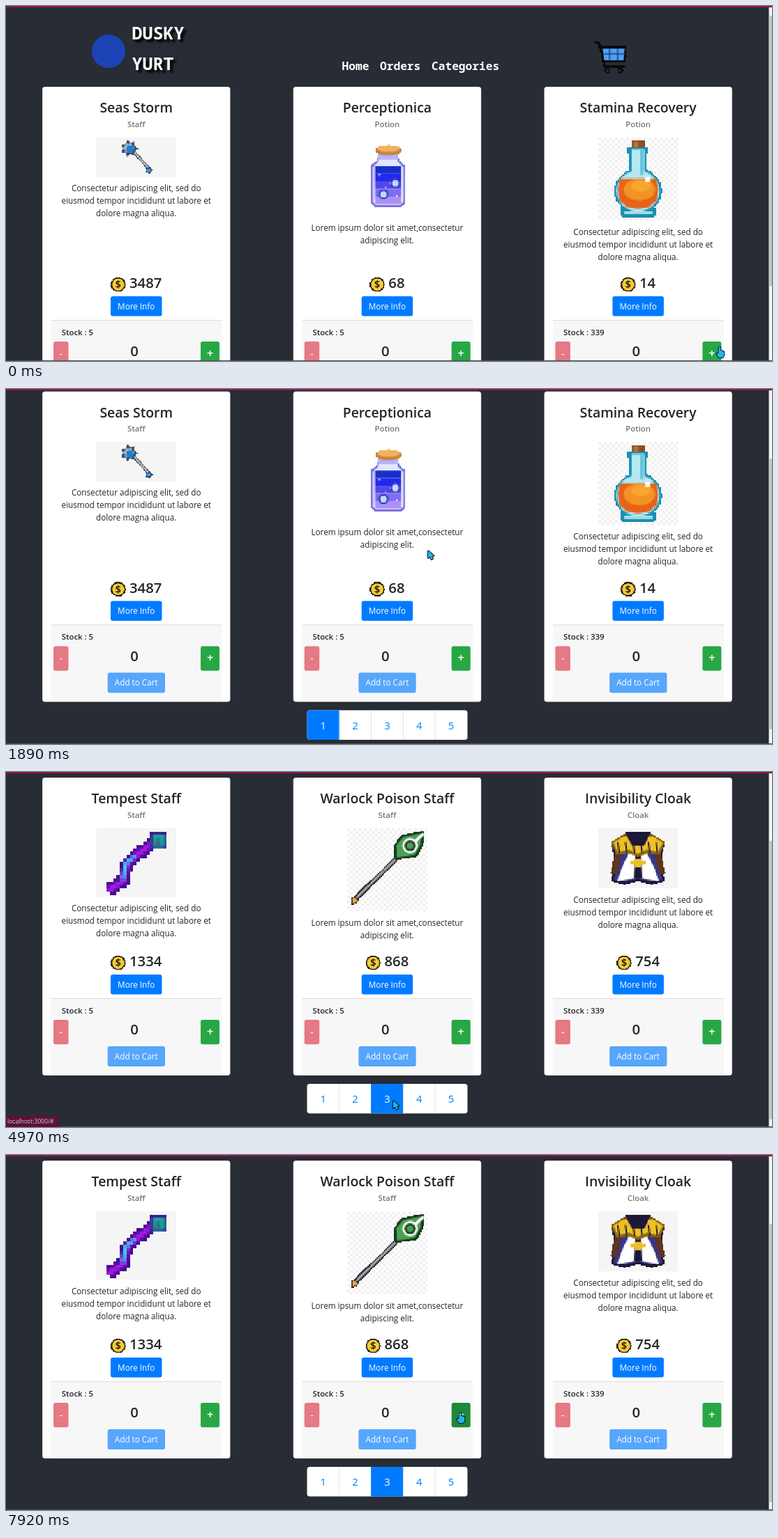
An HTML page with a canvas for the animation above (8 s loop, 1098x510 px).

```html
<!DOCTYPE html>
<html lang="en">
<head>
<meta charset="utf-8">
<title>Shop</title>
<style>
html, body { margin: 0; width: 100%; height: 100%; overflow: hidden; background: #282c34; }
canvas { display: block; width: 1098px; height: 510px; }
</style>
</head>
<body>
<canvas id="stage" width="1098" height="510"></canvas>
<script>
const LOOP = 8000;
const ctx = document.getElementById('stage').getContext('2d');
const SANS = '"Open Sans", "Noto Sans", sans-serif';
const MONO = '"Noto Sans Mono", "DejaVu Sans Mono", monospace';
const INK = '#212529';
const clamp = v => Math.max(0, Math.min(1, v));
const smooth = v => clamp(v) ** 2 * (3 - 2 * clamp(v));

// ---- drawing helpers ----
function pen(g) {
  const trace = pts => {
    g.beginPath();
    for (let i = 0; i < pts.length; i += 2) g.lineTo(pts[i], pts[i + 1]);
  };
  const poly = (c, ...pts) => { trace(pts); g.fillStyle = c; g.fill(); };
  return {
    poly,
    rect(c, x, y, w, h) { g.fillStyle = c; g.fillRect(x, y, w, h); },
    line(c, w, ...pts) { trace(pts); g.strokeStyle = c; g.lineWidth = w; g.stroke(); },
    oval(c, x, y, rx, ry = rx) {
      g.beginPath(); g.ellipse(x, y, rx, ry, 0, 0, 7); g.fillStyle = c; g.fill();
    },
    // Symmetric shape: each pair is half a width and its height
    mirror(c, axis, ...half) {
      const right = [], left = [];
      for (let i = 0; i < half.length; i += 2) {
        right.push(axis + half[i], half[i + 1]);
        left.unshift(axis - half[i], half[i + 1]);
      }
      poly(c, ...right, ...left);
    },
    star(c, x, y, r, n) {
      const pts = [];
      for (let i = 0; i < 2 * n; i++) {
        const a = i * Math.PI / n, d = i % 2 ? r * 0.62 : r;
        pts.push(x + d * Math.cos(a), y + d * Math.sin(a));
      }
      poly(c, ...pts);
    }
  };
}
const main = pen(ctx);

function box(c, x, y, w, h, r = 3) {
  ctx.beginPath(); ctx.roundRect(x, y, w, h, r); ctx.fillStyle = c; ctx.fill();
}

function text(s, x, y, size, color = INK, weight = 400, align = 'center', family = SANS) {
  ctx.font = `${weight} ${size}px ${family}`;
  ctx.textAlign = align;
  ctx.fillStyle = color;
  ctx.fillText(s, x, y);
}

// Small hard-edged picture, enlarged by "cell" when shown
function sprite(w, h, cell, draw, unit = 1) {
  const c = document.createElement('canvas');
  c.width = Math.ceil(w / cell);
  c.height = Math.ceil(h / cell);
  const g = c.getContext('2d');
  g.scale(unit / cell, unit / cell);
  draw(pen(g));
  const img = g.getImageData(0, 0, c.width, c.height);
  for (let i = 3; i < img.data.length; i += 4) img.data[i] = img.data[i] > 110 ? 255 : 0;
  g.putImageData(img, 0, 0);
  return (x, y) => ctx.drawImage(c, x, y, c.width * cell, c.height * cell);
}

const plain = h => (x, y) => main.rect('#f5f5f5', x, y, 114.5, h);
const checkers = sprite(115, 119.5, 0.5, p => {
  p.rect('#fff', 0, 0, 115, 120);
  for (let i = 0; i < 29; i++)
    for (let j = i % 2; j < 30; j += 2) p.rect('#f1f1f1', i * 4, j * 4, 4, 4);
});

// ---- pictures ----
const coin = sprite(22, 22, 1.3, p => {
  p.oval('#15130c', 10.7, 10.7, 10.7);
  p.oval('#f7cb35', 10.7, 10.7, 8.8);
});

const cart = sprite(48, 48, 1.6, p => {
  p.poly('#0a0a0a', 8, 7, 47, 7, 45, 30, 13, 30);
  p.poly('#4f9ff5', 12, 10, 44, 10, 42, 27, 15, 27);
  for (const x of [22, 34]) p.line('#173b78', 2, x, 10, x, 28);
  p.line('#173b78', 2, 12, 18, 45, 18);
  p.line('#0a0a0a', 3, 0, 2, 7, 2, 15, 36, 44, 36);
  for (const x of [19, 37]) { p.oval('#0a0a0a', x, 42, 4); p.oval('#555', x, 42, 1.5); }
});

const seaStaff = sprite(115, 57, 1.4, p => {
  p.line('#4c505e', 4.5, 54, 21, 79, 49);
  p.line('#c6c9d4', 2.2, 54, 21, 79, 49);
  p.star('#3d5470', 47, 16, 13, 7);
  p.star('#9db8cc', 46, 15, 9, 6);
  p.oval('#1b7fd3', 48, 17, 5);
  p.star('#2b4f78', 75, 47, 6, 5);
  p.rect('#4aa3e0', 73, 45, 4, 4);
});

const jar = sprite(115, 114, 1.7, p => {
  p.mirror('#7b73dc', 58.5, 15, 28, 16, 33, 25, 41, 25, 94, 19, 100);
  p.mirror('#e2e5ff', 58.5, 13, 28, 14, 35, 22, 43, 22, 93, 17, 97);
  for (let i = 0; i < 5; i++)
    p.rect(`hsl(${232 + i * 6}, 80%, ${44 + i * 8}%)`, 40, 41 + i * 11, 37, 11);
  for (let i = 0; i < 6; i++) p.rect('#fff', 45 + i * 23 % 30, 53 + i * 6, 2, 2);
  for (const [x, y] of [[52, 82], [69, 66]]) {
    p.oval('#2f3fc4', x, y, 7);
    p.oval('#c4d8ff', x, y, 4.8);
  }
  p.rect('#b5b4f4', 44, 22, 29, 10);
  p.oval('#c98443', 59, 19, 19, 7);
  p.oval('#f2b25e', 59, 16, 16, 5);
});

const flask = sprite(115, 119.5, 2.3, p => {
  const glass = '#1b8fb0', pale = '#b4e8f3';
  p.rect('#8f4c26', 48, 4, 18, 12);
  p.rect('#b9713a', 50, 6, 8, 8);
  p.oval(glass, 57, 77, 34, 32);
  p.rect(glass, 33, 101, 49, 13);
  p.rect(glass, 42, 14, 30, 9);
  p.rect(glass, 45, 22, 24, 34);
  p.oval(pale, 57, 77, 31, 29);
  p.rect(pale, 48, 17, 18, 44);
  p.rect('#66c3dc', 60, 18, 5, 36);
  p.rect(pale, 37, 106, 41, 4);
  p.mirror('#e5641c', 57, 26, 59, 29, 74, 27, 90, 16, 100, 0, 103);
  p.oval('#f39324', 59, 75, 23, 16);
  p.oval('#f7a631', 61, 70, 14, 8);
  p.rect('#fff', 67, 57, 7, 7);
});

const rainbow = sprite(115, 120, 7.14, p => {
  const hues = ['#f00', '#f00', '#ffa500', '#fff000', '#6ccc16', '#6ccc16', '#a100f0'];
  ['#bf5a38', '#d9d9d9', '#a34a2c'].forEach((c, i) => p.rect(c, 7 - i % 2, 2 + i, 3 + i % 2 * 2, 1));
  p.rect('#c9a399', 7, 3, 3, 1);
  for (let i = 0; i < 9; i++) {
    const d = Math.abs(i - 4), top = d < 2 ? 5 : d + 5;
    p.rect('#cdcdcd', 4 + i, top, 1, (d < 4 ? 15 : 14) - top);
    if (d < 4) p.rect(hues[i - 1], 4 + i, Math.max(8, top + 1), 1, 6 - Math.max(0, d - 2));
  }
  p.rect('#ffc400', 8, 5, 1, 4);
  p.rect('#1b1e86', 10, 12, 2, 2);
}, 7.14);

const skull = sprite(115, 119.5, 4.2, p => {
  p.line('#161616', 11, 5, 113, 46, 72, 76, 44);
  p.line('#5c5c5c', 4, 8, 109, 46, 70, 76, 42);
  p.mirror('#161616', 90, 16, 5, 23, 12, 23, 35, 16, 48, 10, 52);
  p.mirror('#6a6a6a', 90, 13, 9, 19, 15, 19, 30, 12, 34);
  p.rect('#929292', 78, 10, 17, 6);
  for (const x of [82, 98]) { p.rect('#eab0a5', x, 19, 9, 9); p.rect('#c23a2c', x + 4, 23, 4, 5); }
  for (const x of [79, 91]) p.rect('#7c7c7c', x, 39, 9, 7);
});

const bust = sprite(115, 119.5, 3.3, p => {
  const edge = '#0c0f24', blue = '#3b5cf0';
  for (const x of [18, 96])
    [edge, blue, edge, '#fff'].forEach((c, i) => p.oval(c, x, 70, 14 - i * 3, 17 - i * 3));
  p.mirror(edge, 57, 15, 50, 37, 62, 45, 78, 37, 95, 18, 108);
  p.mirror(blue, 57, 13, 54, 33, 64, 40, 78, 33, 92, 16, 104);
  p.mirror('#1a2490', 57, 32, 75, 28, 90, 12, 101);
  p.oval('#bfe2ff', 44, 65, 6);
  p.rect('#7db2ff', 76, 90, 7, 7);
  p.rect(edge, 43, 18, 28, 36);
  p.rect('#cdd4da', 46, 20, 22, 38);
  p.rect('#8795a3', 56, 22, 4, 26);
  p.rect('#c74a12', 41, 4, 33, 17);
  p.rect('#ff9d1c', 43, 7, 28, 8);
});

const tempest = sprite(115, 98.5, 4.8, p => {
  const rod = [16, 90, 38, 76, 44, 50, 84, 18];
  p.line('#4a0b8f', 17, ...rod);
  p.line('#a21be8', 8, ...rod);
  p.line('#36d3ee', 5, 38, 74, 42, 50, 56, 40);
  p.rect('#4a0b8f', 76, 6, 26, 24);
  p.rect('#17a39b', 80, 9, 19, 18);
  p.rect('#2d6f86', 84, 16, 8, 8);
});

const warlock = sprite(115, 119.5, 1.9, p => {
  p.line('#26262c', 7, 11, 102, 78, 36);
  p.line('#a7a3ad', 3.5, 11, 102, 78, 36);
  p.star('#33250f', 10, 104, 7, 3);
  p.star('#e0a75a', 10, 104, 5, 3);
  p.poly('#163d1d', 68, 46, 66, 24, 78, 10, 110, 4, 109, 24, 100, 41);
  p.poly('#4d9f55', 71, 42, 70, 25, 80, 13, 105, 8, 105, 23, 97, 38);
  p.line('#fff', 4, 94, 22, 109, 8);
  ['#fff', '#163d1d', '#4d9f55'].forEach((c, i) => p.oval(c, 90, 25, 11 - i * 3));
});

const cloak = sprite(115, 86.5, 1.7, p => {
  const navy = '#1b1838', gold = '#efc024';
  p.mirror(navy, 57, 20, 8, 38, 24, 32, 48, 39, 76, 20, 81, 0, 76);
  p.mirror('#3a3685', 57, 18, 20, 28, 46, 35, 74, 18, 77, 0, 72);
  p.mirror('#fff', 57, 12, 34, 22, 54, 30, 76, 0, 71);
  p.mirror(navy, 57, 4, 34, 6, 72);
  for (const side of [-1, 1]) p.line('#5d3520', 9, 57 + side * 28, 35, 57 + side * 35, 66);
  p.mirror('#8f6a0e', 57, 20, 9, 39, 20, 31, 38, 14, 36, 0, 41);
  p.mirror(gold, 57, 21, 12, 35, 21, 29, 34, 13, 31, 0, 37);
  for (let x = 28; x < 90; x += 11) p.line(navy, 1.8, x, 20, x + 2, 36);
  p.mirror(navy, 57, 18, 6, 9, 25);
  p.rect(gold, 46, 47, 22, 5);
  p.rect(gold, 52, 44, 10, 12);
});

// ---- content ----
const LONG = ['Consectetur adipiscing elit, sed do', 'eiusmod tempor incididunt ut labore et', 'dolore magna aliqua.'];
const BRIEF = ['Lorem ipsum dolor sit amet,consectetur', 'adipiscing elit.'];
const LOREM = ['Lorem Sed do eiusmod tempor', 'incididunt ut labore et dolore magna', 'aliqua.'];
const STOCK = [5, 5, 339];
const item = (name, kind, price, lines, h, art, back) => ({ name, kind, price, lines, h, art, back });
const PAGES = [
  { h: 446, items: [
    item('Seas Storm', 'Staff', 3487, LONG, 57, seaStaff, plain(57)),
    item('Perceptionica', 'Potion', 68, BRIEF, 114, jar),
    item('Stamina Recovery', 'Potion', 14, LONG, 119.5, flask, checkers)] },
  { h: 446, items: [
    item('Rainbow Potion', 'Potion', 487, LONG, 114, rainbow),
    item('Raising Skull', 'Staff', 4684, LOREM, 119.5, skull, checkers),
    item('Magic Bust', 'Potion', 18, LOREM, 119.5, bust, checkers)] },
  { h: 428, items: [
    item('Tempest Staff', 'Staff', 1334, LONG, 98.5, tempest, plain(98.5)),
    item('Warlock Poison Staff', 'Staff', 868, BRIEF, 119.5, warlock, checkers),
    item('Invisibility Cloak', 'Cloak', 754, LONG, 86.5, cloak, plain(86.5))] }
];

// ---- motion ----
// Screen refreshes seen so far in a move that shows n of them from a to b
function refreshes(t, a, b, n) {
  if (t < a) return 0;
  return Math.min(n, 1 + Math.floor((t - a + 25) * (n - 1) / (b - a)));
}

const move = (a, b, n, to, bend) => ({ a, b, n, to, bend });
const MOVES = [
  move(100, 490, 5, [605, 232]),
  move(2230, 3030, 8, [500, 466], [357, 523]),
  move(3780, 4540, 8, [555, 472]),
  move(6070, 6730, 7, [650, 370]),
  move(7060, 7830, 8, [650, 370], [470, 246])
];

function mouseAt(t) {
  let pos = [1022, 490];
  for (const { a, b, n, to, bend } of MOVES) {
    const s = refreshes(t, a, b, n) / n;
    pos = pos.map((v, i) => {
      const mid = bend ? bend[i] : (v + to[i]) / 2;
      return (1 - s) ** 2 * v + 2 * s * (1 - s) * mid + s * s * to[i];
    });
  }
  return pos;
}

const scrollAt = t => 126 * smooth((refreshes(t, 1680, 2020, 4) - 0.45) / 3.2);

function statusAt(t) {
  const span = [[3120, 3900], [4320, 5840], [7400, 7610]].find(([a, b]) => t >= a && t < b);
  return span ? clamp((span[1] - t) / 110) : 0;
}

// ---- parts of the page ----
let mx, my, scroll, hand;

// Links show a hand; they light up once the pointer is well inside
function over(x, y, w, h) {
  const dx = Math.abs(mx - x - w / 2), dy = Math.abs(my + scroll - y - h / 2);
  hand = hand || (dx < w / 2 && dy < h / 2);
  return dx < w / 2 - 4 && dy < h / 2 - 4;
}

function header() {
  main.oval('#1c43b5', 147, 65, 24);
  ctx.save();
  ctx.shadowColor = '#000';
  ctx.shadowOffsetX = ctx.shadowOffsetY = 4;
  ctx.shadowBlur = 3;
  ['DUSKY', 'YURT'].forEach((s, i) => text(s, 180.5, 48 + i * 44, 25, '#fff', 700, 'left', MONO));
  ctx.restore();
  text('Home', 481.5, 92, 16.2, '#fff', 700, 'left', MONO);
  text('Orders', 536, 92, 16.2, '#fff', 700, 'left', MONO);
  text('Categories', 610, 92, 16.2, '#fff', 700, 'left', MONO);
  cart(843, 51);
}

function card(it, cx, h, stock) {
  const x = cx - 134.7, b = 116 + h, left = cx - 57.2;
  box('#dfdfdf', x, 116, 269.5, h, 4);
  box('#fff', x + 0.8, 116.8, 267.9, h - 1.6);
  text(it.name, cx, 153.3, 19.4, INK, 600);
  text(it.kind, cx, 174, 11.4, '#6c757d', 600);
  if (it.back) it.back(left, 188.7);
  it.art(left, 188.7);
  it.lines.forEach((s, i) => text(s, cx, 209 + it.h + i * 18, 11.7));

  ctx.font = `600 20.3px ${SANS}`;
  const px = cx - (27 + ctx.measureText(it.price).width) / 2;
  coin(px, b - 172.5);
  text('$', px + 10.7, b - 156.6, 15, '#15130c', 600);
  text(it.price, px + 27, b - 156.6, 20.3, INK, 600, 'left');
  box(over(cx - 36.7, b - 145, 73.5, 28.5) ? '#0069d9' : '#007bff', cx - 36.7, b - 145, 73.5, 28.5);
  text('More Info', cx, b - 126.4, 11.7, '#fff');

  main.rect('#f7f7f7', x + 12.5, b - 111, 245, 110);
  main.rect('#dcdcdc', x + 12.5, b - 111, 245, 1);
  text('Stock : ' + stock, x + 27.7, b - 89, 11.4, INK, 600, 'left');
  box('#e57984', x + 16, b - 80, 21.5, 35.3);
  text('-', x + 26.7, b - 57, 15, '#fff');
  text('0', cx - 2.7, b - 58.7, 20.3, INK, 600);
  box(over(x + 227, b - 80, 27, 35.3) ? '#218838' : '#28a745', x + 227, b - 80, 27, 35.3);
  text('+', x + 240.5, b - 57.5, 17, '#fff', 600);
  box('#56a6fc', cx - 41, b - 42, 82.3, 29);
  text('Add to Cart', cx, b - 23, 11.7, '#fff');
}

function pager(y, active) {
  box('#fff', 431.5, y, 230, 42.5, 4);
  for (let i = 0; i < 5; i++) {
    const x = 431.5 + i * 45.8, on = i === active;
    const hot = !on && over(x, y, 45.8, 42.5);
    if (i) main.rect('#dee2e6', x, y, 1, 42.5);
    if (on || hot) box(on ? '#007bff' : '#e9ecef', x, y, 46.8, 42.5, i ? 0 : [4, 0, 0, 4]);
    text(i + 1, x + 23.3, y + 27.3, 14.8, on ? '#fff' : hot ? '#0056b3' : '#007bff');
  }
}

function frameEdges(max, status) {
  const len = 485 * 508 / (508 + max);
  main.rect('#f3f3f3', 1093.5, 2, 4.5, 507);
  main.rect('#c1c1c1', 1094.5, 14 + (485 - len) * scroll / max, 3.5, len);
  main.rect('#95124c', 0, 0, 1098, 2);
  main.rect('#4b4c4f', 0, 509, 1098, 1);
  ctx.globalAlpha = status;
  box('#5a1238', 0, 494, 76, 16, [0, 3, 0, 0]);
  text('localhost:3000/#', 2, 505, 8.6, '#d8c8d2', 400, 'left');
  ctx.globalAlpha = 1;
}

function pointer() {
  const shape = hand
    ? [0, 0, 2, 0, 2.5, 5, 7, 6.5, 7.5, 11, 5.5, 15, -0.5, 15, -4, 9, -0.8, 9.5]
    : [0, 0, 0, 11, 2.7, 8.8, 4.8, 13, 7, 12, 5, 8, 8.5, 7.8];
  ctx.save();
  ctx.translate(mx, my);
  ctx.lineJoin = 'round';
  main.line('#0b1620', 2, ...shape, 0, 0);
  main.poly('#25b4f2', ...shape);
  ctx.restore();
}

function draw(t) {
  const active = t < 3220 ? 0 : t < 4970 ? 1 : 2;
  const { h, items } = PAGES[active], max = h - 320;
  [mx, my] = mouseAt(t);
  scroll = Math.min(scrollAt(t), max);
  hand = false;

  ctx.imageSmoothingEnabled = false;
  main.rect('#282c34', 0, 0, 1098, 510);
  ctx.save();
  ctx.translate(0, -scroll);
  header();
  items.forEach((it, i) => card(it, 186.7 + i * 359.7, h, STOCK[i]));
  pager(128 + h, active);
  ctx.restore();
  frameEdges(max, statusAt(t));
  pointer();
}

function tick() {
  draw(performance.now() % LOOP);
  requestAnimationFrame(tick);
}
tick();
</script>
</body>
</html>
```
